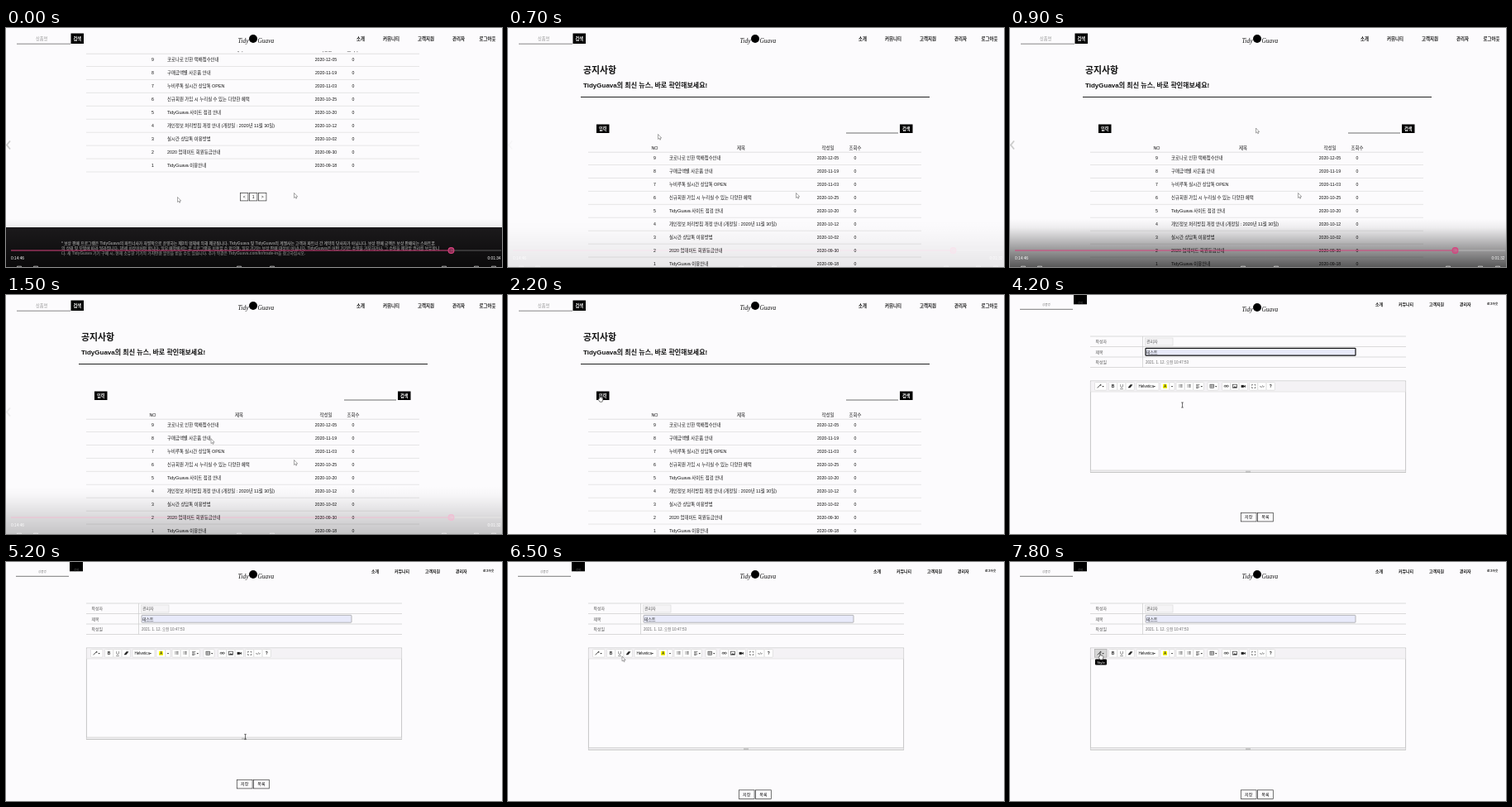
Recreate the animation shown at these times as an HTML page. Size 600 by 289 pixels, loop 8 s.

```html
<!DOCTYPE html>
<html lang="ko">
<head>
<meta charset="utf-8">
<style>
html, body { margin: 0; width: 100%; height: 100%; overflow: hidden; background: #fcfbfd; }
svg { display: block; width: 600px; height: 289px; }
text { font-family: "Liberation Sans", "Noto Sans CJK KR", sans-serif; white-space: pre; }
.logo { font-family: "Liberation Serif", serif; font-style: italic; }
</style>
</head>
<body>
<svg id="stage" viewBox="0 0 600 289"></svg>
<script>
const BRAND = 'TidyGuava', BG = '#fcfbfd';
const $ = id => document.getElementById(id);

// Markup helpers; text is placed by its vertical middle.
const text = (x, y, s, size = 5.4, fill = '#111', extra = '') =>
  `<text x="${x}" y="${y + size * .36}" font-size="${size}" fill="${fill}" ${extra}>${s}</text>`;
const mid = (x, y, s, size, fill, extra = '') => text(x, y, s, size, fill, 'text-anchor="middle" ' + extra);
const rect = (x, y, w, h, fill, stroke = 'none', extra = '') =>
  `<rect x="${x}" y="${y}" width="${w}" height="${h}" fill="${fill}" stroke="${stroke}" stroke-width=".7" ${extra}/>`;
const path = (d, stroke = '#333', width = .7, fill = 'none') =>
  `<path d="${d}" stroke="${stroke}" stroke-width="${width}" fill="${fill}"/>`;
const group = (id, s, extra = '') => `<g id="${id}" ${extra}>${s}</g>`;
const bold = 'font-weight="700"';

const logo = y => text(280.5, y + 2, BRAND.slice(0, 4), 7.6, '#111', 'class="logo"') +
  `<circle cx="299" cy="${y}" r="5" fill="#000"/>` +
  text(304.5, y + 2, BRAND.slice(4), 7.4, '#111', 'class="logo"');
const nav = (xs, y, size, last) => ['소개', '커뮤니티', '고객지원', '관리자', '로그아웃']
  .map((s, i) => text(xs[i], y, s, i == 4 ? last : size, '#111', bold)).join('');
const blackButton = (x, y, s, w = 15.5, h = 10.5) =>
  rect(x, y, w, h, '#000') + mid(x + w / 2, y + h / 2, s, 5.2, '#fff', bold);

function listPage() {
  const rows = [
    ['코로나로 인한 택배접수안내', '12-05'], ['구매금액별 사은품 안내', '11-19'],
    ['누비루톡 실시간 상담톡 OPEN', '11-03'], ['신규회원 가입 시 누리실 수 있는 다양한 혜택', '10-25'],
    [BRAND + ' 사이트 점검 안내', '10-20'], ['개인정보 처리방침 개정 안내 (개정일 : 2020년 11월 30일)', '10-12'],
    ['실시간 상담톡 이용방법', '10-02'], ['2020 업데이트 회원등급안내', '09-30'], [BRAND + ' 이용안내', '09-18']];
  const footer = [
    `* 보상 판매 프로그램은 ${BRAND}의 파트너사가 자발적으로 운영하는 제3의 업체에 의해 제공됩니다. ${BRAND} 및 ${BRAND}의 계열사는 고객과 파트너 간 계약의 당사자가 아닙니다. 보상 판매 금액은 보상 판매되는 스마트폰`,
    `의 상태 및 모델에 따라 달라집니다. 18세 이상이어야 합니다. 일부 매장에서는 본 프로그램을 이용할 수 없으며, 일부 기기는 보상 판매 대상이 아닙니다. ${BRAND}은 어떤 기기든 수량을 거부하거나, 그 수량을 제한할 권리를 보유합니`,
    `다. 새 ${BRAND} 기기 구매 시, 현재 소유한 기기의 가치만큼 할인을 받을 수도 있습니다. 추가 약관은 ${BRAND}.com/kr/trade-in을 참고하십시오.`];
  const body = text(91, 51, '공지사항', 10.9, '#111', bold) +
    text(91, 69.3, BRAND + '의 최신 뉴스, 바로 확인해보세요!', 8, '#111', bold) +
    path('M88 83.5H510', '#222', 1) +
    blackButton(107, 116.5, '입력') + path('M409 127H472') + blackButton(474, 116.5, '검색') +
    [[177.5, 'NO'], [282, '제목'], [387, '작성일'], [420, '조회수']]
      .map(([x, s]) => mid(x, 145.4, s, 5.4)).join('') +
    path('M97 150.2H500', '#d4d4d4', .7) +
    rows.map(([title, date], i) => {
      const y = 157.5 + i * 15.94;
      return mid(177.5, y, 9 - i, 5.2) + text(195, y, title) + mid(387, y, '2020-' + date, 5.2) +
        mid(420, y, 0, 5.2) + path(`M97 ${y + 8}H500`, '#ddd', .7);
    }).join('') +
    ['&lt;', '1', '&gt;'].map((s, i) => rect(283.5 + 11 * i, 318.5, 9.4, 9.4, '#fff', '#333') +
      mid(288.2 + 11 * i, 323.2, s, 5)).join('') +
    rect(0, 360, 600, 60, '#1d1b1d') +
    footer.map((s, i) => text(67, 379.5 + i * 6, s, 4.75, '#ccc', bold)).join('');
  return group('scroll', body) + rect(0, 0, 600, 28, BG) +
    text(36, 13, '상품명', 5.2, '#999') + path('M13 19.2H78', '#555') + blackButton(78.5, 6.5, '검색', 15.5, 12.5) +
    logo(13) + nav([424, 456, 498, 540, 572.5], 13, 5.4, 5.4);
}

function toolbar() {
  const box = (x, w) => rect(x, 105.6, w, 9.6, '#fff', '#d8d8d8', 'rx=".8"');
  const caret = x => path(`M${x} 110h2.4l-1.2 1.4z`, 'none', 0, '#333');
  const lines = (x, widths) => widths.map((w, i) => path(`M${x} ${108.6 + i * 1.3}h${w}`, '#333', .6)).join('');
  return [[102.5, 14.5], [119.5, 10.3], [129.8, 10.3], [140.1, 10.3], [153, 27], [182, 11], [193, 6],
    [201, 10.3], [211.3, 10.3], [221.6, 12.8], [239, 13], [256.5, 10.3], [266.8, 10.3], [277.1, 10.3],
    [289.5, 10.3], [299.8, 10.3], [310.1, 10.3]].map(b => box(...b)).join('') +
    rect(102.5, 105.6, 14.5, 9.6, '#d6d6d6', '#aaa', 'id="styleHover"') +
    path('M105.6 112.4l3.6-3.6M109.6 107.8v1.6M110.6 109h-2', '#333', .8) + caret(111.4) +
    mid(124.6, 110.4, 'B', 5, '#222', bold) + mid(135, 110.2, 'U', 5, '#222', 'text-decoration="underline"') +
    path('M143 112l2.6-3.4h2.4l-2.6 3.4z', '#222', .5, '#222') +
    text(155.5, 110.4, 'Helvetica', 4.5) + caret(173.6) +
    rect(185, 107.8, 5, 5, '#ff0') + mid(187.5, 110.4, 'A', 4.5, '#222', bold) + caret(194.8) +
    lines(204.3, [.7, .7, .7]) + lines(205.6, [3, 3, 3]) +
    lines(214.4, [.7, .7, .7]) + lines(215.8, [3, 3, 3]) +
    lines(225, [4.4, 3, 4.4, 3]) + caret(230.6) +
    rect(242, 108.2, 4.4, 4, 'none', '#333') + path('M242 110.2h4.4M244.2 108.2v4', '#333', .5) + caret(248) +
    rect(259, 109.3, 2.8, 1.8, 'none', '#333', 'rx=".9"') + rect(261.6, 109.3, 2.8, 1.8, 'none', '#333', 'rx=".9"') +
    rect(269.6, 108.2, 4.8, 4, 'none', '#333') + path('M270 112l1.5-1.8 1 .9 .8-.7 1 1.6z', 'none', 0, '#333') +
    rect(279.6, 108.9, 3.3, 3, '#222') + path('M282.5 110.4l2.3-1.6v3.2z', 'none', 0, '#222') +
    path('M292.6 109.6v-1.2h1.2M295.6 108.4h1.2v1.2M296.8 111.2v1.2h-1.2M293.8 112.4h-1.2v-1.2') +
    mid(305, 110.3, '&lt;/&gt;', 4) + mid(315.3, 110.4, '?', 5, '#222', bold);
}

function formPage() {
  const button = (x, s) => rect(x, 263.3, 18.8, 10.6, BG, '#333') + mid(x + 9.4, 268.6, s, 5);
  return text(39, 11.3, '상품명', 3.5, '#777') + path('M12 17.3H76', '#444') +
    rect(77, 0, 16, 11.3, '#000') + mid(85, 10.2, '검색', 3.3, '#666') +
    logo(15) + nav([442, 470, 507, 544, 577], 11, 4.9, 3.6) +
    [50, 62.5, 75, 87.5].map(y => path(`M97 ${y}H479`, '#ccc', .7)).join('') + path('M160.5 50V87.5', '#ccc', .7) +
    ['작성자', '제목', '작성일'].map((s, i) => text(103.5, 56.4 + i * 12.4, s, 4.9, '#555')).join('') +
    rect(163.5, 52, 33.5, 9, '#f5f4f6', '#ddd') + text(165, 56.5, '관리자', 4.9, '#555') +
    rect(164, 64.3, 254, 8.9, '#fff', '#999', 'id="field" rx=".8"') + text(165, 68.9, '', 4.9, '#222', 'id="value"') +
    text(164, 81.6, '2021. 1. 12. 오전 10:47:53', 4.5, '#666') +
    rect(97.3, 104, 381.4, 110.5, '#fdfcfe', '#b0b0b0', 'id="frame"') +
    rect(97.6, 104.3, 380.8, 12.6, '#f4f2f5') + path('M97.3 117H478.7', '#ddd') + toolbar() +
    group('lower', rect(97.6, 212, 380.8, 2.3, '#f0eff1') + path('M97.3 212H478.7M97.3 214.5H478.7', '#b8b8b8', .5) +
      path('M285 213.2h6M285 214.1h6', '#999', .5) + button(279.3, '저장') + button(299.5, '목록')) +
    group('menu', rect(165, 74.5, 76, 50, '#000', 'none', 'opacity=".18"') + rect(164, 73.4, 76, 49.6, '#fff', '#ccc') +
      rect(164, 0, 76, 14.2, '#c4c4c4', 'none', 'id="pick"') +
      ['테스트', '안녕', '안녕11'].map((s, i) => text(169, 83.5 + i * 14.3, s, 5.3)).join('')) +
    group('tip', rect(103, 117.6, 14, 7, '#000', 'none', 'rx="1"') + path('M108.6 117.8l1.4-1.5 1.4 1.5z', 'none', 0, '#000') +
      mid(110, 121, 'Style', 4.3, '#fff'));
}

function player() {
  const marks = [16, 36, 282, 322, 530, 569, 590];
  return `<defs><linearGradient id="shade" x1="0" y1="0" x2="0" y2="1"><stop stop-opacity="0"/>
    <stop offset=".18" stop-opacity=".06"/><stop offset="1" stop-opacity=".65"/></linearGradient></defs>` +
    rect(0, 231, 600, 58, 'url(#shade)') + path('M5 136.5L1 141.5 5 146.5', '#ccc', 1.8) +
    path('M538 269H599', '#ffffff50', 1) + path('M6 269H535', '#d8427f', 1.2) +
    '<circle cx="538.5" cy="269" r="3.4" fill="#d8427f99" stroke="#d8427f" stroke-width="1.1"/>' +
    text(6, 278, '0:14:46', 4.8, '#fff') + text(582.5, 278, '', 4.8, '#fff', 'id="left"') +
    marks.map(x => path(`M${x - 2.5} 289v-.8h5v.8`, '#eee', .7)).join('');
}

const arrow = path('M0 0V6L1.4 4.8 2.3 6.8 3.2 6.4 2.4 4.5H4.2z', '#555', .5, '#fff');
const cursors = {
  arrow,
  hand: path('M1.4 4.4V.6Q2 -.2 2.6 .6V3Q5.6 2.8 5.8 4.2V6L5 8.2H2L.2 5.4Q0 4.4 1.4 4.4z', '#222', .6, '#fff'),
  beam: path('M-1.3 -3h2.6M0 -3v6M-1.3 3h2.6', '#333', .7),
  resize: path('M0 -3.5V3.5M-1.3 -2.2L0 -3.5 1.3 -2.2M-1.3 2.2L0 3.5 1.3 2.2', '#333', .7)
};

$('stage').innerHTML = rect(0, 0, 600, 289, BG) + group('list', listPage()) + group('form', formPage()) +
  group('player', player()) + group('viewer', arrow, 'transform="translate(348.5 199.5)"') +
  group('cursor', Object.entries(cursors).map(([k, s]) => group(k, s)).join(''));

// Linear interpolation over [time, ...values] keys.
function along(t, keys) {
  let i = 0;
  while (i < keys.length - 2 && t >= keys[i + 1][0]) i++;
  const a = keys[i], b = keys[i + 1];
  const p = Math.min(1, Math.max(0, (t - a[0]) / (b[0] - a[0])));
  return a.slice(1).map((v, j) => v + (b[j + 1] - v) * p);
}
const pointer = [[0, 207.5, 204.5], [100, 207.5, 204.5], [700, 181.5, 128.5], [900, 297.5, 121], [1300, 262, 104],
  [1800, 227, 278], [2000, 109, 121], [2300, 109, 121], [2900, 172, 68.5], [3100, 172, 68.5], [3300, 173, 109.5],
  [3400, 173, 109.5], [3600, 174, 82], [3900, 174, 82], [4300, 220, 150], [5200, 289.5, 211.3], [5300, 289.5, 213.5],
  [5900, 289.5, 226], [6200, 138, 114], [6500, 138, 114], [6700, 107, 110]];
const veil = [[0, 1], [300, 1], [700, .12], [800, .6], [900, 1], [1100, 1], [1700, 0]];
const shapes = [[0, 'arrow'], [2000, 'hand'], [2300, 'arrow'], [2800, 'beam'], [3200, 'hand'], [4000, 'arrow'],
  [4200, 'beam'], [5300, 'resize'], [6000, 'beam'], [6100, 'arrow'], [6600, 'hand']];
const values = [[0, ''], [3200, '테스트'], [3300, '안녕11'], [3500, '안녕'], [3600, '테스트']];
const at = (t, steps) => steps.filter(s => s[0] <= t).pop()[1];
const show = (id, on) => $(id).style.display = on ? '' : 'none';
const set = (id, attrs) => { for (const k in attrs) $(id).setAttribute(k, attrs[k]); };

function draw(now) {
  const t = Math.floor((now % 8000) / 100) * 100;
  const form = t >= 2300, focus = t >= 3100 && t < 4300, value = at(t, values);
  show('list', !form);
  show('form', form);

  const p = Math.min(1, Math.max(0, t / 500));
  set('scroll', { transform: `translate(0 ${-119 * (1 - p) ** 2})` });
  set('player', { opacity: along(t, veil)[0] });
  $('left').textContent = t < 500 ? '0:01:34' : '0:01:32';
  show('viewer', t < 1700);

  $('value').textContent = value;
  set('field', { fill: value ? '#e8eafa' : '#fff', stroke: focus ? '#111' : '#999', 'stroke-width': focus ? 1.2 : .7 });
  show('menu', t >= 3100 && t < 3900);
  show('pick', value);
  set('pick', { y: 76.4 + 14.3 * Math.max(0, ['테스트', '안녕', '안녕11'].indexOf(value)) });

  const [grow] = along(t, [[5300, 0], [5900, 12.5]]);
  set('frame', { height: 110.5 + grow });
  set('lower', { transform: `translate(0 ${grow})` });
  show('styleHover', t >= 6700);
  set('tip', { opacity: along(t, [[6600, 0], [6800, 1]])[0] });

  set('cursor', { transform: `translate(${along(t, pointer).join(' ')})` });
  const shape = at(t, shapes);
  for (const k in cursors) show(k, k == shape);
}

const start = performance.now();
(function loop() {
  draw(performance.now() - start);
  requestAnimationFrame(loop);
})();
</script>
</body>
</html>
```
